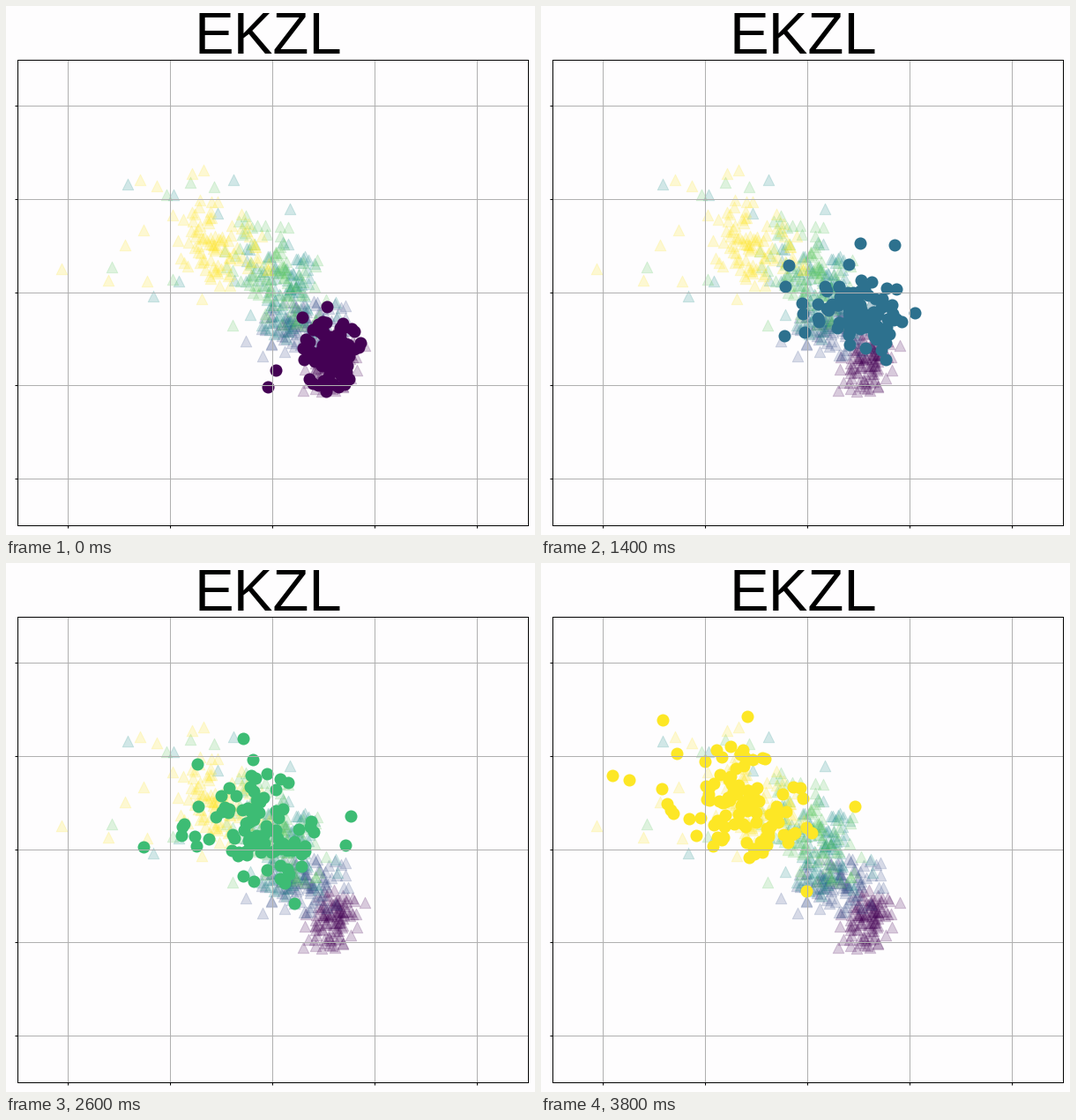
A matplotlib script for the animation above (4000 ms loop, 600x600 px).

```python
import numpy as np
import matplotlib.pyplot as plt
from matplotlib.animation import FuncAnimation

FRAMES, INTERVAL = 20, 200
DPI = 100
PX = 72 / DPI  # points per pixel
LEFT, RIGHT, TOP, BOTTOM = 12.5, 591.5, 60.5, 588.5
BG = "#fefdfe"

rng = np.random.default_rng(12)
cmap = plt.get_cmap("viridis")


def gauss(n, limit=2.1):
    """Normal pairs with the far tails pulled in."""
    z = rng.standard_normal((n, 2))
    r = np.hypot(z[:, 0], z[:, 1])[:, None]
    return z * np.minimum(1, limit / r)


def spread(z, mean, std, corr):
    """Shape unit normals into a tilted cloud."""
    x, y = z[:, 0], corr * z[:, 0] + np.sqrt(1 - corr**2) * z[:, 1]
    return np.column_stack([mean[0] + std[0] * x, mean[1] + std[1] * y])


# Marginal clouds: mean, std, correlation, stray points
CLOUDS = [
    ((370, 402), (15, 17), -0.2, [(337, 436), (407, 385)]),
    ((340, 362), (24, 16), 0.0, [(385, 340), (272, 380), (291, 397)]),
    ((318, 323), (28, 27), 0.3,
     [(138, 202), (190, 214), (258, 197), (322, 230), (240, 235), (167, 329),
      (196, 312)]),
    ((305, 300), (28, 30), 0.4,
     [(209, 200), (236, 205), (182, 214), (120, 296), (189, 310), (257, 362)]),
    ((242, 270), (27, 24), 0.35,
     [(63, 298), (116, 311), (135, 271), (156, 254), (152, 197), (171, 204),
      (211, 190), (224, 186), (160, 312), (222, 332)]),
]

# Moving cloud: step, mean x, mean y, std x, std y, correlation
KEYS = np.array([
    (0, 369, 395, 16, 19, -0.1),
    (3, 375, 378, 23, 16, 0.1),
    (7, 360, 347, 27, 20, 0.15),
    (11, 306, 320, 34, 29, 0.2),
    (15, 262, 280, 35, 33, 0.35),
    (19, 223, 271, 41, 31, 0.35),
])

# Outermost dots, one path per row
RIM_STEPS = (0, 7, 11, 19)
RIM = np.array([
    [(297, 432), (276, 374), (181, 349), (81, 241)],
    [(306, 413), (277, 318), (233, 317), (100, 246)],
    [(336, 353), (281, 294), (243, 245), (138, 178)],
    [(364, 341), (362, 269), (281, 207), (234, 174)],
    [(392, 366), (401, 271), (403, 290), (356, 276)],
    [(400, 387), (424, 348), (413, 327), (301, 300)],
    [(363, 437), (391, 401), (335, 390), (301, 372)],
])

N_CORE = 93
z_start, z_end = gauss(N_CORE), gauss(N_CORE)


def dots(step):
    mx, my, sx, sy, corr = [np.interp(step, KEYS[:, 0], col)
                            for col in KEYS[:, 1:].T]
    turn = step / (FRAMES - 1) * np.pi / 2
    z = z_start * np.cos(turn) + z_end * np.sin(turn)
    core = spread(z, (mx, my), (sx, sy), corr)
    rim = [[np.interp(step, RIM_STEPS, c) for c in path.T] for path in RIM]
    return np.vstack([core, rim])


fig = plt.figure(figsize=(6, 6), dpi=DPI, facecolor=BG)
ax = fig.add_axes([LEFT / 600, 1 - BOTTOM / 600,
                   (RIGHT - LEFT) / 600, (BOTTOM - TOP) / 600], facecolor=BG)
ax.set_xlim(LEFT, RIGHT)
ax.set_ylim(BOTTOM, TOP)
ax.set_xticks(LEFT + (RIGHT - LEFT) * (np.arange(5) + 0.5) / 5)
ax.set_yticks(TOP + (BOTTOM - TOP) * (np.arange(5) + 0.5) / 5)
ax.tick_params(length=3 * PX, width=PX, labelbottom=False, labelleft=False)
ax.grid(True, color="#b0b0b0", linewidth=PX)
for spine in ax.spines.values():
    spine.set_linewidth(PX)
fig.text(297 / 600, 1 - 54 / 600, "EKZL", fontsize=67 * PX, ha="center",
         va="baseline", family="Liberation Sans", color="black")

for i, (mean, std, corr, strays) in enumerate(CLOUDS):
    core = spread(gauss(100 - len(strays)), mean, std, corr)
    pts = np.vstack([core, strays])
    ax.scatter(pts[:, 0], pts[:, 1], s=(12.6 * PX) ** 2, marker="^",
               color=cmap(i / 4), alpha=0.2, linewidths=0.9 * PX)

moving = ax.scatter([], [], s=(14 * PX) ** 2, marker="o", linewidths=0)


def update(step):
    moving.set_offsets(dots(step))
    moving.set_facecolor(cmap(step / (FRAMES - 1)))
    return (moving,)


anim = FuncAnimation(fig, update, frames=FRAMES, interval=INTERVAL,
                     repeat=True, repeat_delay=0, blit=False)
plt.show()
```
